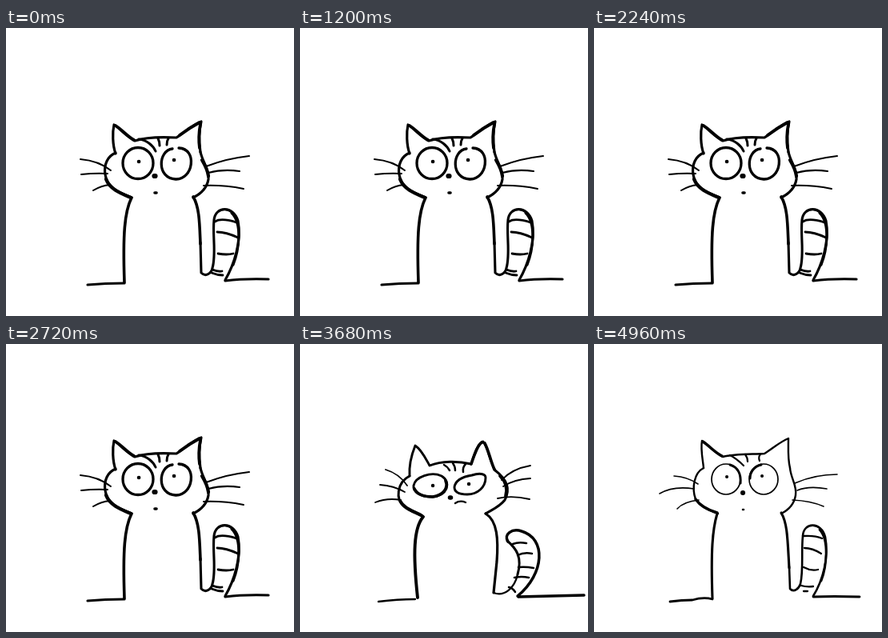
An HTML page with a canvas for the animation above (5.04 s loop, 360 by 360 pixels).

```html
<!DOCTYPE html>
<html lang="en">
<head>
<meta charset="utf-8">
<title>Staring cat</title>
<style>
  html, body { margin: 0; width: 100%; height: 100%; overflow: hidden; background: #fff; }
  canvas { display: block; }
</style>
</head>
<body>
<canvas id="stage" width="360" height="360"></canvas>
<script>
const ctx = document.getElementById('stage').getContext('2d');
const STEP = 80, STEPS = 63;

const oval = (x, y, rx, ry) =>
  `M${x - rx},${y}A${rx} ${ry} 0 1 1 ${x + rx},${y}A${rx} ${ry} 0 1 1 ${x - rx},${y}`;
const dot = (x, y) => `M${x},${y}h.1`;

// A drawing is a list of [line width, path] strokes.
const stareA = [
  [3.2, 'M137,157C133,146 133,130 135,121C144,127 151,136 161,141C176,136 195,136 213,137C224,130 233,121 244,117C241,130 241,142 243,155'],
  [3.8, 'M137,122C145,127 151,135 160,140M217,134Q229,125 242,118M243,120Q240,136 242,150'],
  [3.2, 'M137,156C127,160 122,171 124,183C126,200 143,206 157,212M243,155C246,168 254,177 253,189C251,202 242,208 234,212'],
  [4.2, 'M125,189C130,202 144,207 156,212M245,165Q252,177 253,185'],
  [3, 'M166,139C176,140 184,147 187,154M190,138Q192,142 192,147M203,138Q201,141 201,146'],
  [3.3, oval(165, 169, 19, 19.5) + 'M216,150C240,151 234,190 212,189C188,188 190,153 208,151'],
  [4.6, dot(166, 167) + dot(210, 165)],
  [3.6, 'M186,206h2'],
  [6.2, 'M185.5,185h1'],
  [2, 'M93,164Q116,166 131,178M94,183Q112,181 127,182M109,203Q119,197 130,196M250,173Q276,163 304,160M253,181Q271,176 292,179M247,197Q272,196 297,201'],
  [3.6, 'M157,212C148,230 146,258 148,318M234,211C242,224 242,246 243,270'],
  [3.1, 'M148,319Q124,319 102,321M243,268L244,306C250,312 257,306 258,300C263,283 258,260 260,240C262,222 284,222 290,241C295,266 285,296 274,315'],
  [3.2, 'M274,316Q297,313 328,314M282,231C296,245 291,278 284,296'],
  [2.8, 'M261,242Q269,237 288,243M264,255Q275,255 290,262M265,282Q276,284 284,282M258,302Q265,305 270,304M257,306Q264,309 271,309']
];

const stareB = [
  [2.4, 'M137,155C136,144 133,132 135,121C144,127 152,137 161,141C176,137 197,138 213,137C224,130 233,122 243,118C243,131 242,143 245,155'],
  [3.6, 'M136,122C144,127 150,135 160,140'],
  [2.4, 'M137,155C125,161 122,180 127,194C133,204 144,208 155,212M245,155C246,168 254,177 252,189C250,202 242,208 234,212'],
  [3.4, 'M127,194C134,204 144,208 154,211'],
  [2.2, 'M170,139Q178,143 187,152M189,138Q192,142 192,147M208,138Q205,141 207,146'],
  [1.7, oval(165, 169, 18, 19) + oval(212, 169, 18, 19)],
  [3, 'M170,151C180,154 184,163 183,174M209,151C200,153 195,160 195,168'],
  [4, dot(166, 166) + dot(210, 165)],
  [2.5, 'M186,207h1'],
  [6, dot(186, 186)],
  [1.6, 'M100,165Q117,166 130,175M82,187Q99,177 125,181M104,206Q112,197 131,195M251,174Q276,163 304,163M254,183Q268,177 291,181M248,195Q271,196 287,203'],
  [3.1, 'M154,212C148,232 146,258 148,318M234,211C242,224 242,246 244,280'],
  [2.6, 'M244,278L245,306C250,311 256,306 258,300C262,283 259,260 261,240C262,222 284,222 289,241C294,266 286,296 274,315'],
  [2.8, 'M148,319Q137,316 123,320Q110,320 95,322M274,316Q298,315 332,316M282,232C294,245 291,278 284,296'],
  [2.3, 'M262,240Q276,239 285,243M263,255Q273,255 284,262M262,279Q271,284 280,282M259,302Q266,304 274,303M262,309h5']
];

const glareA = [
  [2.9, 'M137,165C136,151 140,137 144,127C152,132 157,143 162,152C177,146 197,146 214,150C218,138 223,122 229,122C235,130 237,146 244,158'],
  [3.6, 'M214,150C218,138 223,124 228,123M231,124C236,133 238,146 243,157'],
  [3, 'M137,165C121,173 119,194 130,203C137,209 145,211 154,216M244,158C261,171 262,184 256,195C249,204 240,207 232,212'],
  [3.8, 'M125,196C131,207 144,209 153,215M250,165C257,172 260,180 257,190'],
  [2.5, 'M180,151Q184,153 187,158M191,149Q194,153 194,158M207,150Q203,154 204,160'],
  [2.9, 'M142,177C144,166 164,159 177,165C190,173 184,190 165,191C150,191 141,185 142,177M193,179C194,171 203,166 215,164C224,161 232,162 232,167C232,179 222,188 209,188C199,188 193,185 193,179'],
  [3.7, 'M143,181C147,189 157,191 166,191C179,189 186,180 182,171'],
  [4.4, dot(166, 177) + dot(211, 175)],
  [5.5, 'M187.5,192h1'],
  [2.3, 'M194,199Q200,195 207,198'],
  [1.8, 'M107,157Q124,162 134,177M100,176Q117,177 131,185M94,198Q109,192 126,195M252,170Q265,156 288,152M254,178Q268,169 288,168M247,193Q265,189 287,194'],
  [3.9, 'M154,216C142,230 141,262 147,317'],
  [3.2, 'M232,212C247,221 248,245 246,272L242,311'],
  [2.3, 'M144,319Q122,319 98,322M242,311C255,316 268,306 272,288'],
  [3, 'M272,288C278,267 271,256 259,246'],
  [3.5, 'M260,247C254,238 265,230 277,234C308,243 306,287 272,315L273,316Q308,315 355,314'],
  [2.5, 'M266,250Q273,247 283,249M272,264Q280,260 290,262M273,279Q282,278 292,280M268,292Q277,290 286,292M261,304Q266,305 269,310']
];

// Redraws a pose with slightly wavering lines; swaps replace bits of path.
const redraw = (strokes, seed, swaps) => strokes.map(([width, d]) => {
  for (const [from, to] of swaps) d = d.replace(from, to);
  return [width, d.replace(/([\d.]+),([\d.]+)/g, (_, x, y) => {
    const dx = Math.sin(y / 19 + seed) * 0.9, dy = Math.sin(x / 23 + seed * 2) * 0.8;
    return `${(+x + dx).toFixed(1)},${(+y + dy).toFixed(1)}`;
  })];
});

const stareC = redraw(stareA, 2, [
  ['Q297,313 328,314', 'Q299,314 335,315'],
  ['M93,164', 'M97,162'], ['297,201', '293,204'], ['M94,183', 'M88,185']
]);
const glareB = redraw(glareA, 1, [['355,314', '358,315'], ['98,322', '95,322']]);
const glareC = redraw(glareA, 4, [['M94,198', 'M90,200'], ['98,322', '92,321']]);

const compile = strokes => strokes.map(([width, d]) => [width, new Path2D(d)]);
const stare = [stareA, stareB, stareC].map(compile);
const glare = [glareA, glareB, glareC].map(compile);

ctx.lineCap = ctx.lineJoin = 'round';
ctx.strokeStyle = '#000';

function draw(now) {
  const step = Math.floor(now / STEP) % STEPS;
  const pose = step >= 46 && step < 55 ? glare : stare;
  const turn = step < 20 ? step : step - 1; // one drawing is held twice
  ctx.fillStyle = '#fff';
  ctx.fillRect(0, 0, 360, 360);
  for (const [width, path] of pose[turn % 3]) {
    ctx.lineWidth = width;
    ctx.stroke(path);
  }
}

const start = performance.now();
function tick() {
  draw(performance.now() - start);
  requestAnimationFrame(tick);
}
tick();
</script>
</body>
</html>
```
